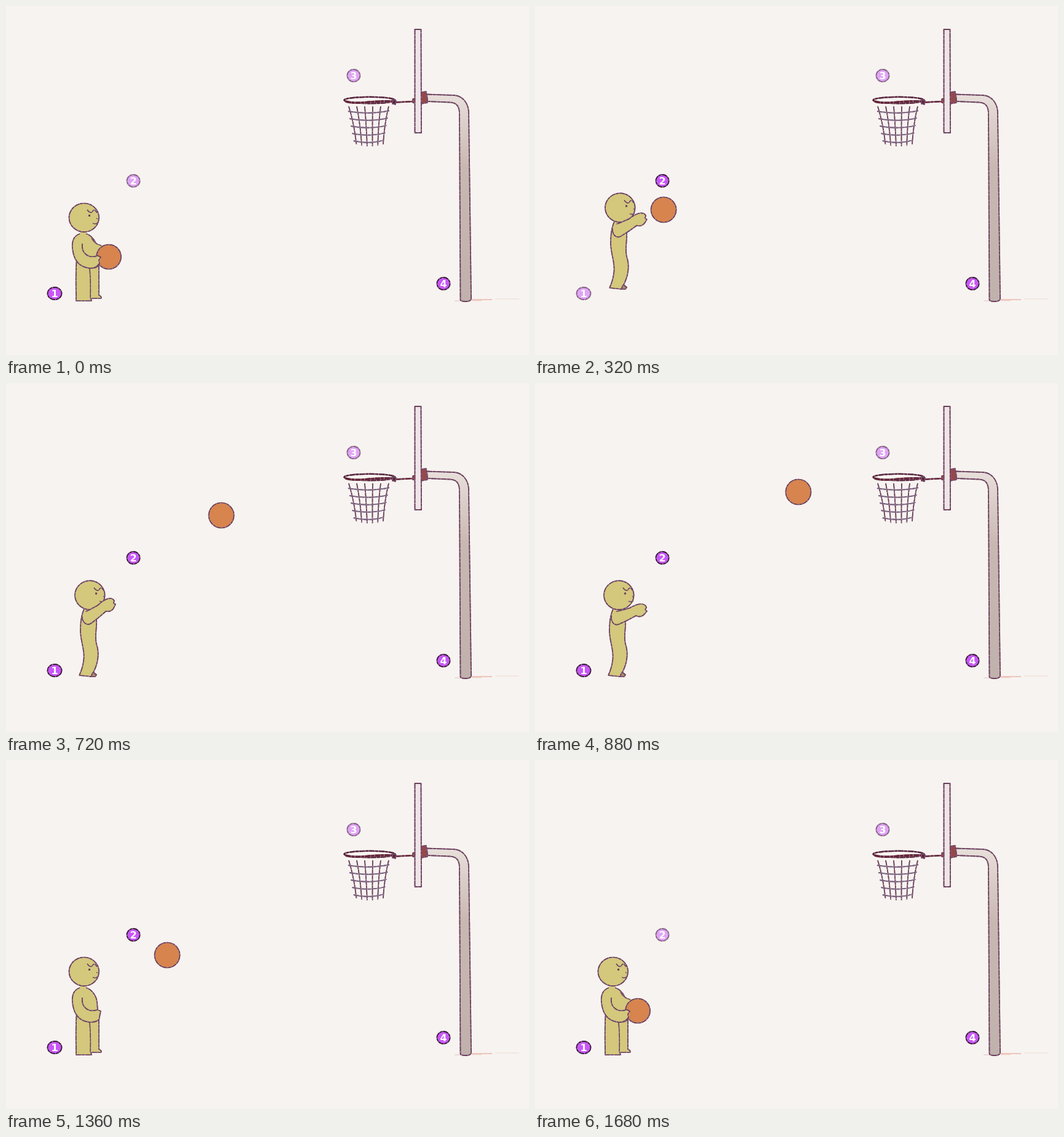
An HTML page with a canvas for the animation above (1.76 s loop, 850 by 567 pixels).

```html
<!DOCTYPE html>
<html lang="en">
<head>
<meta charset="utf-8">
<title>Free throw</title>
<style>
  html, body { margin: 0; width: 100%; height: 100%; overflow: hidden; background: #f7f3f0; }
  canvas { display: block; }
</style>
</head>
<body>
<canvas id="stage" width="850" height="567"></canvas>
<script>
const ctx = document.getElementById('stage').getContext('2d');
const STEP = 80, STEPS = 22;
const SKIN = '#d3c87c', LINE = '#6a3f5c', FAINT = '#a98c9d';

const RELEASE = 3, CATCH = 19;
// Ball centre for every step of the flight, from release to catch
const flight = [
  [190, 357], [209, 331], [228, 307], [249, 284], [273, 263], [311, 238],
  [350, 215], [389, 195], [428, 177], [469, 162], [510, 148], [529, 147],
  [441, 191], [352, 249], [262, 317], [198, 373]
];
// Arm angle in degrees while the figure stands in profile
const armAngles = [-12, -25, -33, -38, -37, -36, -30, -23, -17, 8];
const jumps = { 4: 17, 5: 21, 6: 11 };
const squash = { 1: .98, 2: .95, 19: .97, 20: .985 };

// Crayon outline: a soft base line with a darker broken line on top
function ink(d, fill, width = 1.7, color = LINE) {
  const path = d instanceof Path2D ? d : new Path2D(d);
  if (fill) { ctx.fillStyle = fill; ctx.fill(path); }
  ctx.lineWidth = width;
  ctx.lineJoin = 'round';
  ctx.strokeStyle = FAINT;
  ctx.stroke(path);
  ctx.setLineDash([9, .8, 5, 1]);
  ctx.strokeStyle = color;
  ctx.stroke(path);
  ctx.setLineDash([]);
}

function disc(x, y, rx, ry, fill, width, color) {
  const path = new Path2D();
  path.ellipse(x, y, rx, ry, 0, 0, 7);
  ink(path, fill, width, color);
}

const ball = (x, y, r = 20.5) => disc(x, y, r, r, '#d7844e');

function marker(label, x, y, lit, rx = 10.5) {
  ctx.save();
  ctx.globalAlpha = lit ? 1 : .5;
  disc(x, y, rx, 10, '#c956fa', 1.8, '#3d1743');
  ctx.globalAlpha = 1;
  ctx.fillStyle = '#fff';
  ctx.font = 'bold 16px "DejaVu Sans", sans-serif';
  ctx.textAlign = 'center';
  ctx.fillText(label, x, y + 6);
  ctx.restore();
}

function face(dx, dy) {
  ctx.save();
  ctx.translate(dx, dy);
  ink('M132 331 Q136 337 140 335 Q142 330 145 332 L148 336', null, 1.4);
  ink('M141 353 Q146 355 149 352 M147 345 L149 346', null, 1.3);
  ctx.fillStyle = LINE;
  ctx.fillRect(134, 339, 3, 3);
  ctx.restore();
}

function facingFigure(holding, scale) {
  ctx.save();
  ctx.translate(0, 480);
  ctx.scale(1, scale);
  ctx.translate(0, -480);
  ink('M114.5 415 C113 440 114 465 114 479 L139 479 L138 475 L155 475 Q155 471 151 470 L151 420 Z', SKIN);
  ink('M136 427 Q138 450 137 475', null, 1.5);
  const torso = 'M120 370 C108 374 106 386 109 400 C112 416 122 425 137 426 C146 426 153 423 152 417 L154 408 L149 406 L148 393 C147 383 139 372 130 370';
  ink(torso, SKIN);
  ctx.fillStyle = SKIN;
  ctx.fillRect(120, 364, 10, 10);
  disc(126.8, 343.8, 24.3, 23.3, SKIN);
  face(0, 0);
  if (holding) {
    ctx.fillStyle = SKIN;
    ctx.fill(new Path2D('M138 376 Q144 387 157 389 L148 402 L138 400 Z'));
    ink('M139 377 Q144 387 155 389', null, 1.5);
    ball(167, 407.5, 20);
    ctx.fillStyle = SKIN;
    ctx.fill(new Path2D('M138 409 L148 405 L154 408 L152 418 Q147 426 137 425 Z'));
    ink('M148 405 L154 408 L151 413 L152 418 Q147 426 137 426', null);
  }
  ink('M124 386 C122 400 132 411 148 406', null);
  ctx.restore();
}

function profileFigure(angle, jump) {
  ctx.save();
  ctx.translate(jump / 8.5, -jump);
  ink('M142 470 L147 474 L145 477 L137 477', '#a98a6c', 1.7);
  ink('M127 367 C122 378 121 390 121 402 C121 420 129 435 126 452 Q124 465 119 475 L139 477 Q139 472 142 470 C150 455 152 438 147 424 C144 410 148 398 147 384 L138 366', SKIN);
  disc(136.3, 344.7, 24.3, 23.5, SKIN);
  face(11, 1.5);
  ctx.translate(131, 382);
  ctx.rotate(angle * Math.PI / 180);
  ink('M-5 -6 C-10 2 -6 12 2 11 C12 10 24 8 33 6 C37 10 42 10 46 8 L52 4 L50 1 L53 -2 Q53 -8 46 -10 C38 -12 32 -10 26 -9 Q14 -9 4 -10', SKIN);
  ctx.restore();
}

function hoop() {
  // Ground shadow
  ctx.lineWidth = 1.3;
  for (const [x1, x2, y, color] of [
    [729, 742, 479, '#e3d0cb'], [756, 790, 477, '#e8b9ae'],
    [757, 773, 478.5, '#f0cbbf'], [795, 834, 476, '#f0e3dd']]) {
    ctx.strokeStyle = color;
    ctx.beginPath();
    ctx.moveTo(x1, y);
    ctx.lineTo(x2, y);
    ctx.stroke();
  }

  const metal = ctx.createLinearGradient(0, 143, 0, 480);
  metal.addColorStop(0, '#e8dfdb');
  metal.addColorStop(.18, '#d8cbc6');
  metal.addColorStop(.35, '#c8b8b2');
  metal.addColorStop(1, '#c0b1ac');
  ink('M684 143.5 L728 145 C742 146 751 157 752 172 L756 476 Q755 480 747 480 Q739 480 738.5 477 L737 175 Q737 157 722 156.5 L685 155 Z', metal, 1.8);
  ink('M675 140 L683 139 L685 157 L675 159 Z', '#97474a', 1.6);
  ink('M633 156.5 L664 155', null, 2.6, '#642539');
  ink('M661 151 L667 149 L667 159 L661 157 Z', '#97474a', 1.2, '#642539');
  ink('M664.5 38 L674.5 38 L675 206 L664.5 206 Z', '#eee4e7', 1.8);

  // Net
  for (let i = 0; i < 6; i++) {
    const top = 557 + i * 13, bottom = 569 + i * 8.7;
    ink(`M${top} 163 Q${top + (bottom - top) * .75} 192 ${bottom + .5} ${225 + Math.sin(i * .63) * 3}`, null, 1.7);
  }
  for (let i = 0; i < 5; i++) {
    const y = 171 + i * 12, inset = i * 2.2;
    ink(`M${556 + inset} ${y} Q590 ${y + 6} ${623 - inset} ${y - 1}`, null, 1.8, '#75607c');
  }

  // Rim
  disc(591, 153, 41.5, 5.2, null, 2.4, '#55243a');
  ink('M552 155 Q566 159 590 156 Q615 154 632 155', null, 3.5, '#642539');
  ink('M628 152 L634 154 L633 160 L628 159 Z', '#55243a', 1.5);
}

function draw(step) {
  const flying = step >= RELEASE && step < CATCH;
  const profile = step - RELEASE;
  const jump = jumps[step] || 0;

  ctx.fillStyle = '#f7f3f0';
  ctx.fillRect(0, 0, 850, 567);
  hoop();
  if (profile >= 0 && profile < armAngles.length) profileFigure(armAngles[profile], jump);
  else facingFigure(!flying, squash[step] || 1);
  if (flying) ball(...flight[profile]);

  marker('1', 79, 467, !jump, 11.5);
  marker('2', 207, 284, flying);
  marker('3', 565, 113, step === 14);
  marker('4', 711, 451, true);
}

function tick() {
  draw(Math.floor(performance.now() / STEP) % STEPS);
  requestAnimationFrame(tick);
}
tick();
</script>
</body>
</html>
```
